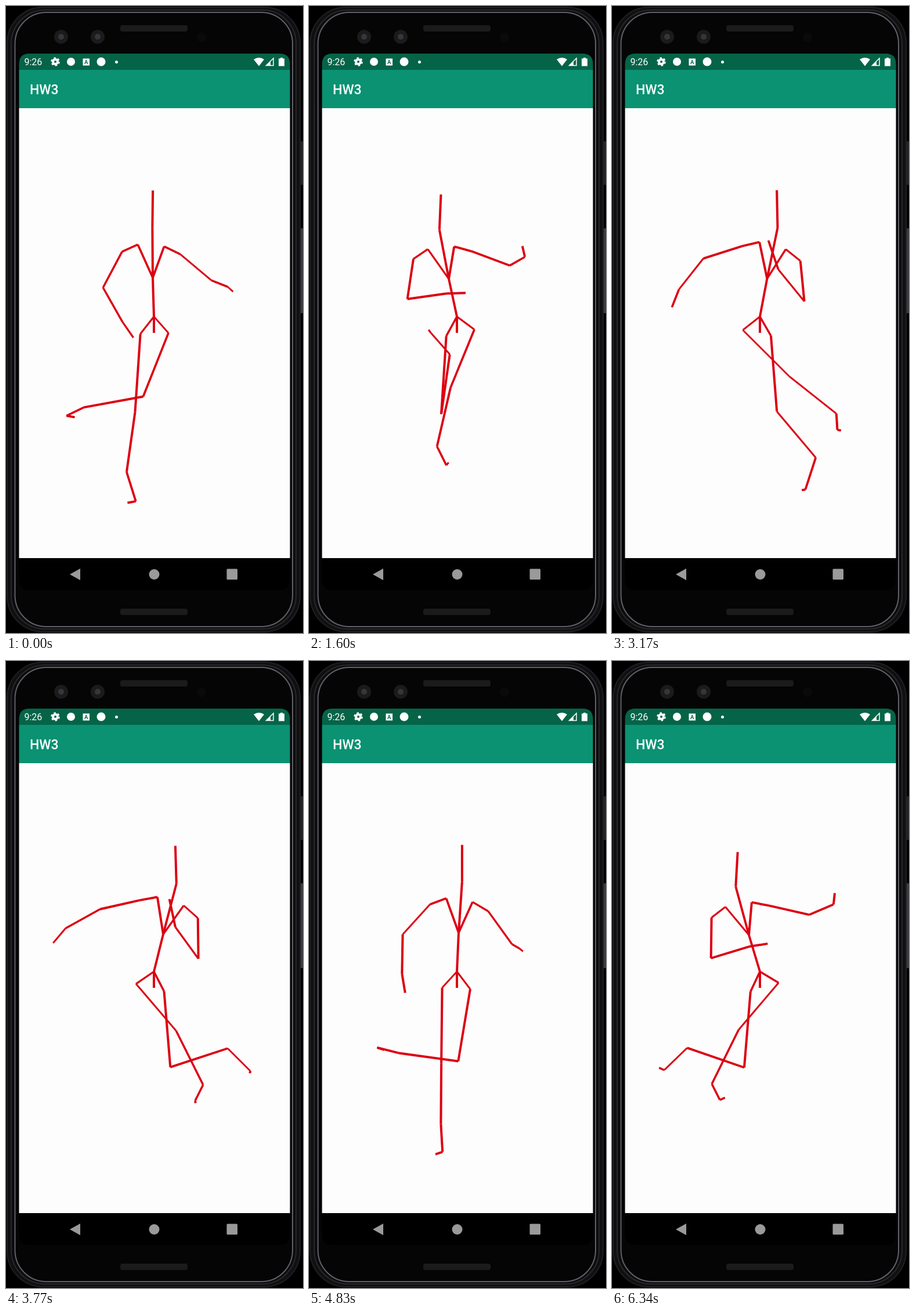
An HTML page for the animation above (6.38 s loop, 512x1080 px).

```html
<!DOCTYPE html>
<html lang="en">
<head>
<meta charset="utf-8">
<title>Running skeleton</title>
<style>
html, body { margin: 0; width: 100%; height: 100%; overflow: hidden; background: #000; }
svg { display: block; width: 512px; height: 1080px; }
text { font-family: Roboto, sans-serif; fill: #fff; }
</style>
</head>
<body>
<svg viewBox="0 0 512 1080">
  <rect width="512" height="1080"/>
  <path d="M508 233h4v75h-4z" fill="#242426"/>
  <path d="M508 383h4v146h-4z" fill="#3c3c40"/>
  <rect x="2" y="2" width="505" height="1076" rx="62" fill="#101012" stroke="#202024" stroke-width="2"/>
  <rect x="9" y="7" width="491" height="1066" rx="58" fill="#0c0c0d" stroke="#28282c" stroke-width="2"/>
  <rect x="15.5" y="11" width="478.5" height="1058" rx="54" fill="#050505" stroke="#606066" stroke-width="2"/>
  <g fill="#1b1b1c">
    <rect x="197" y="33" width="116" height="11" rx="4"/>
    <rect x="197" y="1038" width="116" height="11" rx="4"/>
    <circle cx="95" cy="53" r="12"/><circle cx="158" cy="53" r="12"/>
  </g>
  <g fill="#34363c"><circle cx="95" cy="53" r="5"/><circle cx="158" cy="53" r="5"/></g>
  <circle cx="337" cy="54" r="8" fill="#0a0a0c"/>

  <path d="M22.5 110V100Q22.5 82 40 82H472Q489.5 82 489.5 100V110Z" fill="#056448"/>
  <path d="M22.5 110h467v66h-467z" fill="#0a9273"/>
  <path d="M22.5 176h467v775h-467z" fill="#fdfdfd"/>
  <path d="M22.5 951h467v37q0 18-18 18h-431q-18 0-18-18z"/>
  <text x="31.5" y="102" font-size="16">9:26</text>
  <text x="41" y="152" font-size="23" font-weight="500">HW3</text>
  <g fill="#fff">
    <circle cx="85" cy="96" r="4" fill="none" stroke="#fff" stroke-width="4"/>
    <circle cx="85" cy="96" r="6.5" fill="none" stroke="#fff" stroke-width="2.5" stroke-dasharray="3.4 3.4"/>
    <circle cx="112" cy="96" r="7"/>
    <rect x="132.5" y="90.5" width="11.5" height="12"/>
    <text x="138.2" y="100" font-size="9.5" font-weight="700" text-anchor="middle" style="fill:#056448">A</text>
    <circle cx="164" cy="96" r="7.5"/>
    <circle cx="190.5" cy="96.5" r="2.5"/>
    <path d="M427 92Q436 86 445 92L436 103.5Z"/>
    <path d="M448.5 102.5L461 90V102.5Z" fill="none" stroke="#fff" stroke-width="1.5"/>
    <path d="M448 103L456 95.5V103Z"/>
    <path d="M470 90.5h3v-1.500h4v1.5h3v13h-10z"/>
  </g>
  <g fill="#9a9a9a">
    <path d="M110 979L128 969V989Z"/>
    <circle cx="255.5" cy="979" r="9"/>
    <rect x="380.5" y="969.5" width="18.5" height="18.5" rx="1.5"/>
  </g>
  <g id="figure" stroke="#dc0012"></g>
</svg>
<script>
const LOOP = 6380, STRIDE = 5130;
const LEFT = -1, RIGHT = 1;

// One swing per stride around a mean, highest at the time `peak`
const swing = (amplitude, peak, t) => amplitude * Math.cos(2 * Math.PI * (t - peak) / STRIDE);
const doubleSwing = (amplitude, peak, t) => swing(amplitude, 2 * peak, 2 * t);

const polar = (degrees, length) => {
  const a = degrees * Math.PI / 180;
  return [length * Math.cos(a), length * Math.sin(a)];
};

// Smooth curve through key points that repeats each stride, gaining `turn` every time
function through(points, turn = 0) {
  const n = points.length;
  const spans = points.map(([t], i) => (i + 1 < n ? points[i + 1][0] : STRIDE) - t);
  const steps = points.map(([, v], i) => (i + 1 < n ? points[i + 1][1] : points[0][1] + turn) - v);
  const slopes = steps.map((d, i) => d / spans[i]);
  const tangents = slopes.map((b, i) => {
    const a = slopes[(i + n - 1) % n];
    return a * b > 0 ? 2 * a * b / (a + b) : 0;
  });
  return time => {
    const t = time % STRIDE, i = points.findLastIndex(p => p[0] <= t);
    const u = (t - points[i][0]) / spans[i], w = 1 - u;
    return points[i][1] + steps[i] * u * u * (3 - 2 * u)
      + spans[i] * u * w * (tangents[i] * w - tangents[(i + 1) % n] * u);
  };
}

const leanAt = through([[0, -2], [860, -17], [1210, -19], [1600, -14], [2570, 5], [3770, 16], [4830, 3]]);
const shinAngle = through(
  [[0, 98], [860, 150], [1205, 198], [1600, 278], [2265, 352], [3425, 409], [4165, 437]], 360);

// Joins bone vectors end to end
function chain(start, bones) {
  const points = [start];
  for (const [dx, dy] of bones) {
    const [x, y] = points.at(-1);
    points.push([x + dx, y + dy]);
  }
  return points;
}

// Both legs share one gait, mirrored and half a stride apart
function leg(side, t, s) {
  const p = side === LEFT ? t : t + STRIDE / 2;
  const mirror = ([x, y]) => [-side * x, y];
  const shin = shinAngle(p);
  const thigh = [
    22 + swing(46, 3350, p) + doubleSwing(14, 3350, p),
    115 - swing(27, 3450, p) - doubleSwing(13, 3450, p)
  ];
  const hip = [255 + side * 24.2 - .42 * s, 564 + side * .4 * s - .006 * s * s];
  return chain(hip, [
    mirror(thigh),
    mirror(polar(shin, 104)),
    mirror(polar(shin - 5 - swing(60, 1000, p), 43 + swing(15, 700, p))),
    [side * (4 + swing(11, 300, t)), swing(5, 4300, t)]
  ]);
}

const forearms = {
  [LEFT](t) {
    const angle = 67 - swing(84, 1220, t);
    return [polar(angle, 68), polar(.83 * angle + 5, 33)];
  },
  [RIGHT]: t => [
    [1 + swing(47, 780, t), -21 + swing(25, 600, t) + doubleSwing(17, -265, t)],
    [-4 + swing(14, 300, t), -21 + swing(22, 500, t) + doubleSwing(14, -250, t)]
  ]
};

function arm(side, t, s) {
  const p = side === LEFT ? t : t + STRIDE / 2;
  const [x, y] = polar(129 - swing(39, 1050, p), 70);
  const shoulder = [
    253.7 + side * 22.7 + 1.87 * s,
    412.2 + side * (2.2 + .32 * s) - .12 * s + .014 * s * s
  ];
  return chain(shoulder, [
    [side * 27.5 - .19 * s, 13 + side * (1.5 + .41 * s) + .04 * s],
    [-side * x, y],
    ...forearms[side](t)
  ]);
}

function skeleton(t) {
  const s = leanAt(t), root = [255, 535];
  const chest = [255 + s, 468 + .011 * s * s];
  const neck = [257 + 2.3 * s, 381 - .1 * s + .016 * s * s];
  const head = [257.5 + 2.15 * s, 317.2 - .25 * s + .02 * s * s];
  const chains = [[root, [255, 563]], [root, chest, neck, head]];
  for (const side of [LEFT, RIGHT]) {
    chains.push([root, ...leg(side, t, s)], [chest, ...arm(side, t, s)]);
  }
  return chains.flatMap(points => points.slice(1).map((p, i) => [...points[i], ...p]));
}

const figure = document.getElementById("figure");
const lines = skeleton(0).map(() =>
  figure.appendChild(document.createElementNS("http://www.w3.org/2000/svg", "line")));

function draw() {
  skeleton(performance.now() % LOOP).forEach(([x1, y1, x2, y2], i) => {
    const dx = x2 - x1, dy = y2 - y1;
    // Strokes keep their width along an axis, so diagonals look thinner
    const width = 4 * Math.max(Math.abs(dx), Math.abs(dy)) / (Math.hypot(dx, dy) || 1);
    const attributes = { x1, y1, x2, y2, "stroke-width": width };
    for (const name in attributes) lines[i].setAttribute(name, attributes[name]);
  });
  requestAnimationFrame(draw);
}
draw();
</script>
</body>
</html>
```
